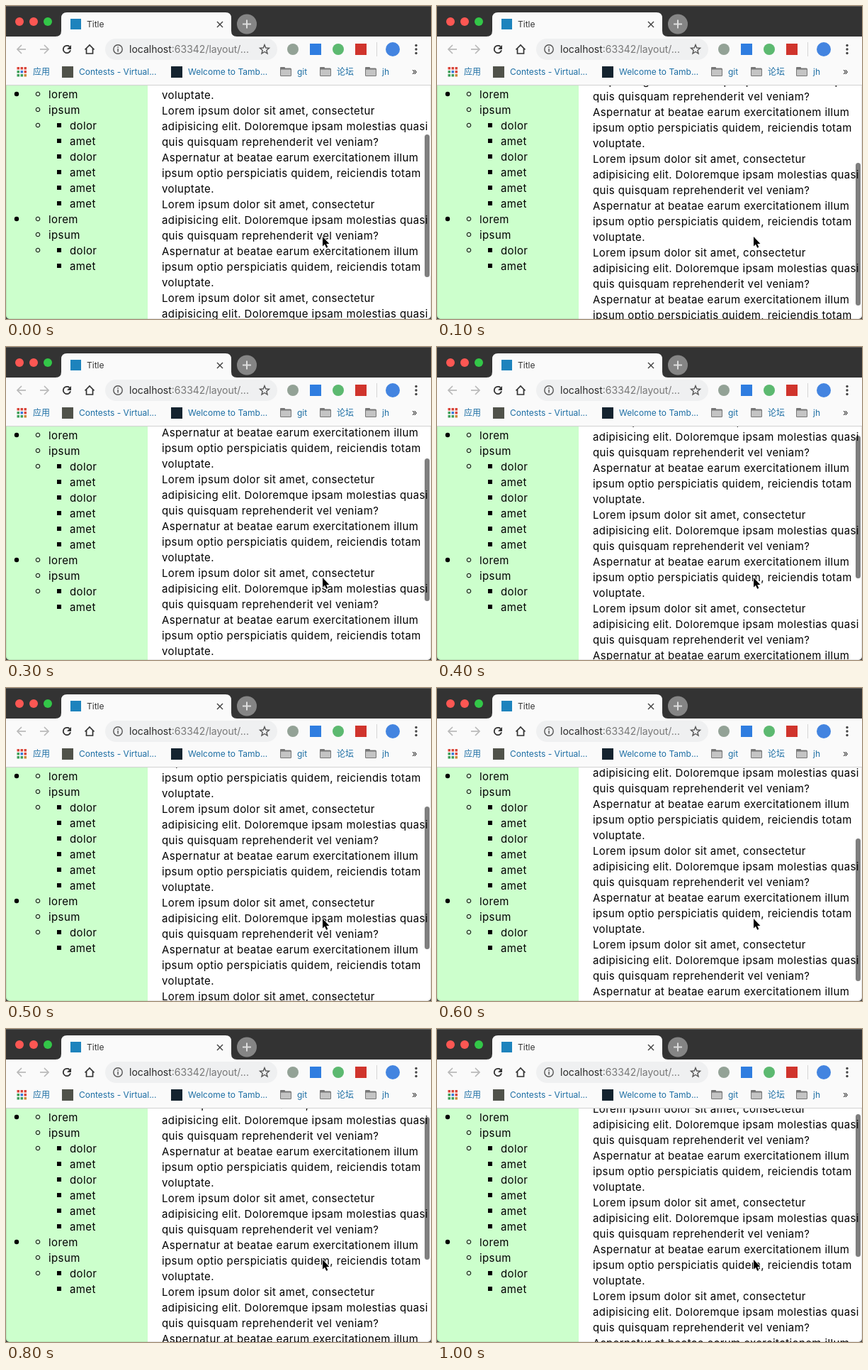
Write an HTML page with a canvas that moves like this. It is 600 by 441 pixels and loops after 1100 ms.

```html
<!DOCTYPE html>
<html lang="en">
<head>
<meta charset="utf-8">
<title>Scrolling page</title>
<style>
html, body { margin: 0; width: 100%; height: 100%; overflow: hidden; background: #fff; }
canvas { display: block; width: 600px; height: 441px; }
</style>
</head>
<body>
<canvas id="stage"></canvas>
<script>
const W = 600, H = 441, STEP = 100;
const canvas = document.getElementById('stage');
const ctx = canvas.getContext('2d');
const dpr = window.devicePixelRatio || 1;
canvas.width = W * dpr;
canvas.height = H * dpr;

const uiFont = size => size + 'px Inter, "Noto Sans CJK SC", "Noto Sans CJK JP", sans-serif';
const TOP = 112, LINE = 22;
const LINK = '#1c6ea4';

const paragraph = [
  'Aspernatur at beatae earum exercitationem illum',
  'ipsum optio perspiciatis quidem, reiciendis totam',
  'voluptate.',
  'Lorem ipsum dolor sit amet, consectetur',
  'adipisicing elit. Doloremque ipsam molestias quasi',
  'quis quisquam reprehenderit vel veniam?'
];

// Vertical centre of one reference line at each step of the scroll.
const scroll = [345, 281, 313, 384, 434, 368, 295, 364, 436, 441, 442];

// Sidebar rows: word, list depth, outer markers shown on the row.
const menu = [
  ['lorem', 1, 'disc'], ['ipsum', 1], ['dolor', 2, 'ring'], ['amet', 2],
  ['dolor', 2], ['amet', 2], ['amet', 2], ['amet', 2],
  ['lorem', 1, 'disc'], ['ipsum', 1], ['dolor', 2, 'ring'], ['amet', 2]
];

function rect(x, y, w, h, color) {
  ctx.fillStyle = color;
  ctx.fillRect(x, y, w, h);
}

function round(x, y, w, h, r, color) {
  ctx.fillStyle = color;
  ctx.beginPath();
  ctx.roundRect(x, y, w, h, r);
  ctx.fill();
}

function dot(x, y, r, color) {
  ctx.fillStyle = color;
  ctx.beginPath();
  ctx.arc(x, y, r, 0, Math.PI * 2);
  ctx.fill();
}

function ring(x, y, r, color, width) {
  ctx.strokeStyle = color;
  ctx.lineWidth = width;
  ctx.beginPath();
  ctx.arc(x, y, r, 0, Math.PI * 2);
  ctx.stroke();
}

function trace(points, closed) {
  ctx.beginPath();
  points.forEach(([x, y]) => ctx.lineTo(x, y));
  if (closed) ctx.closePath();
}

function line(points, color, width, closed) {
  trace(points, closed);
  ctx.strokeStyle = color;
  ctx.lineWidth = width;
  ctx.stroke();
}

function text(str, x, y, font, color, spacing = 0) {
  ctx.font = font;
  ctx.letterSpacing = spacing + 'px';
  ctx.fillStyle = color;
  ctx.fillText(str, x, y);
  return x + ctx.measureText(str).width;
}

function pageText(str, x, y) {
  text(str, x, y + 6, uiFont(15), '#000', 0.39);
}

function drawTabs() {
  rect(0, 0, W, 43, '#333');
  rect(0, 0, W, 1, '#5c5c5c');
  dot(19, 22, 6, '#fc5753');
  dot(39, 22, 6, '#fc5753');
  dot(59, 22, 6, '#33c748');

  ctx.fillStyle = '#fafafa';
  ctx.beginPath();
  ctx.moveTo(70, 43);
  ctx.quadraticCurveTo(78, 43, 78, 35);
  ctx.lineTo(78, 17);
  ctx.quadraticCurveTo(78, 9, 86, 9);
  ctx.lineTo(310, 9);
  ctx.quadraticCurveTo(318, 9, 318, 17);
  ctx.lineTo(318, 35);
  ctx.quadraticCurveTo(318, 43, 326, 43);
  ctx.fill();

  rect(91, 18, 15, 15, '#1d83bd');
  text('Title', 114, 30, uiFont(12), '#333');
  line([[298, 22], [306, 30]], '#444', 1.5);
  line([[306, 22], [298, 30]], '#444', 1.5);

  dot(340, 25.5, 14, '#858585');
  line([[334, 25.5], [346, 25.5]], '#ddd', 2);
  line([[340, 19.5], [340, 31.5]], '#ddd', 2);
}

function drawArrow(x, dir, color) {
  line([[x - 6 * dir, 61], [x + 6 * dir, 61]], color, 1.7);
  line([[x, 55], [x + 6 * dir, 61], [x, 67]], color, 1.7);
}

function drawToolbar() {
  rect(0, 43, W, 69, '#fafafa');
  drawArrow(22, -1, '#b9b9b9');
  drawArrow(54, 1, '#b9b9b9');

  ctx.strokeStyle = '#333';
  ctx.lineWidth = 1.8;
  ctx.beginPath();
  ctx.arc(86, 61, 5.2, 0.25, Math.PI * 1.75);
  ctx.stroke();
  ctx.fillStyle = '#333';
  trace([[92, 55], [92, 61], [86, 61]], true);
  ctx.fill();

  line([[111.5, 61.5], [118, 55], [124.5, 61.5]], '#333', 1.7);
  line([[113.5, 60], [113.5, 67], [122.5, 67], [122.5, 60]], '#333', 1.7);

  round(140, 46, 243, 30, 15, '#eff0f1');
  ring(158, 61, 6.2, '#555', 1.4);
  rect(157.3, 60, 1.5, 4.5, '#555');
  rect(157.3, 57.3, 1.5, 1.5, '#555');
  const end = text('localhost', 174, 66, uiFont(14), '#2b2b2b');
  text(':63342/layout/...', end, 66, uiFont(14), '#777');

  const star = Array.from({ length: 10 }, (_, i) => {
    const a = i * Math.PI / 5 - Math.PI / 2, r = i % 2 ? 3 : 6.8;
    return [365 + r * Math.cos(a), 61.5 + r * Math.sin(a)];
  });
  line(star, '#555', 1.4, true);

  dot(405, 61, 8, '#93a296');
  rect(429, 53, 16, 16, '#2f7de0');
  dot(469, 61, 8, '#5cb970');
  rect(493, 53, 16, 16, '#d0342c');
  rect(523, 51, 1, 20, '#d5d5d5');
  dot(546, 61, 10, '#4384e0');
  for (const y of [55.5, 61, 66.5]) dot(579, y, 1.7, '#444');
}

function drawFolder(x) {
  round(x, 86, 7, 5, 1, '#777');
  round(x, 87.5, 16, 11.5, 1.5, '#777');
  round(x + 1, 89.5, 14, 8.5, 0.5, '#c4c4c4');
}

function drawBookmarks() {
  const dots = ['#d9463b', '#d9463b', '#d9463b', '#3f9f5a', '#3b78d8', '#d9463b', '#3f9f5a', '#3f9f5a', '#c98a3a'];
  dots.forEach((c, i) => rect(15.5 + i % 3 * 5, 86 + Math.floor(i / 3) * 5, 3.5, 3.5, c));
  rect(79, 85, 16, 16, '#50524a');
  rect(233, 85, 16, 16, '#14232f');
  [387, 443, 507].forEach(drawFolder);

  const labels = [
    ['应用', 38], ['Contests - Virtual...', 103], ['Welcome to Tamb...', 257],
    ['git', 411], ['论坛', 467], ['jh', 531]
  ];
  for (const [label, x] of labels) text(label, x, 97, uiFont(12), LINK);
  text('»', 573, 97, uiFont(13), '#333');
  rect(0, 111, W, 1, '#d2d2d2');
}

function drawMenu() {
  rect(0, TOP, 200, H - TOP, '#ccffcc');
  menu.forEach(([word, depth, mark], i) => {
    const y = 124 + i * LINE;
    pageText(word, 30 + depth * 30, y);
    if (mark === 'disc') dot(15, y, 3.2, '#000');
    if (depth === 1 || mark === 'ring') ring(45, y, 2.8, '#000', 1);
    if (depth === 2) rect(72, y - 3, 6, 6, '#000');
  });
}

function drawContent(pos) {
  const first = Math.floor((TOP - pos) / LINE) - 1;
  for (let k = first; pos + k * LINE < H + LINE; k++) {
    pageText(paragraph[(k % 6 + 6) % 6], 220, pos + k * LINE);
  }
  round(591, Math.round(181 + (345 - pos) / 1.6), 7, 201, 3.5, 'rgba(0,0,0,.5)');
}

function drawCursor() {
  const shape = [[447, 325], [447, 338.5], [450, 335.8], [452.2, 340.8], [454.3, 339.8], [452.2, 335], [456.4, 335]];
  line(shape, '#fff', 1.6, true);
  ctx.fillStyle = '#000';
  ctx.fill();
}

function drawEdge() {
  ctx.beginPath();
  ctx.rect(0, TOP, W, H - TOP);
  ctx.roundRect(0, TOP, W, H - TOP, [0, 0, 5, 5]);
  ctx.fillStyle = '#444';
  ctx.fill('evenodd');
  ctx.beginPath();
  ctx.roundRect(0.5, TOP - 10, W - 1, H - TOP + 9.5, [0, 0, 5, 5]);
  ctx.strokeStyle = 'rgba(0,0,0,.2)';
  ctx.lineWidth = 1;
  ctx.save();
  ctx.clip();
  ctx.stroke();
  ctx.restore();
}

function frame() {
  const step = Math.floor(performance.now() / STEP) % scroll.length;
  ctx.setTransform(dpr, 0, 0, dpr, 0, 0);
  rect(0, 0, W, H, '#fff');
  ctx.save();
  ctx.beginPath();
  ctx.rect(0, TOP, W, H - TOP);
  ctx.clip();
  drawMenu();
  drawContent(scroll[step]);
  drawEdge();
  ctx.restore();
  drawTabs();
  drawToolbar();
  drawBookmarks();
  drawCursor();
  requestAnimationFrame(frame);
}
frame();
</script>
</body>
</html>
```
